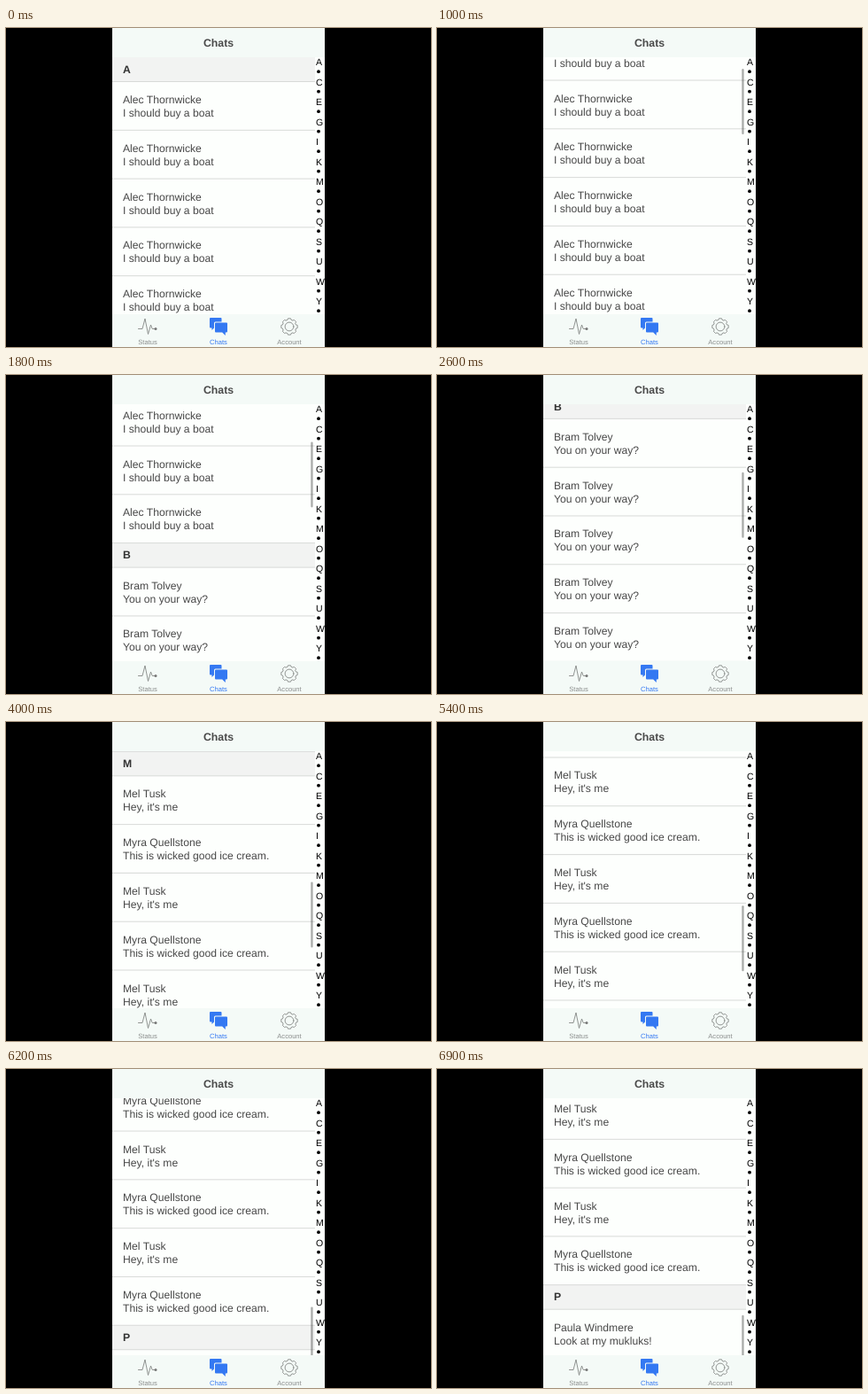
Animation, 480 px wide and 360 px high, one loop 7 s. Source, as an HTML page:

```html
<!DOCTYPE html>
<html lang="en">
<head>
<meta charset="utf-8">
<title>Chats</title>
<style>
  html, body { margin: 0; width: 100%; height: 100%; overflow: hidden; background: #000; }
  svg { display: block; width: 480px; height: 360px; font-family: "Liberation Sans", Arial, sans-serif; text-rendering: geometricPrecision; }
  .row { font-size: 12.15px; fill: #484848; }
  .head { font-size: 12.2px; font-weight: bold; fill: #333; }
  .title { font-size: 12.3px; font-weight: bold; fill: #4a4a4a; text-anchor: middle; }
  .index { font-size: 10.5px; fill: #000; }
  .tab { font-size: 7.6px; fill: #8b8e8d; text-anchor: middle; }
  .icon { fill: none; stroke: #858886; stroke-width: .9; stroke-linejoin: round; stroke-linecap: round; }
  .rule { fill: #d8dad8; }
  .band { fill: #f2f3f2; }
</style>
</head>
<body>
<svg viewBox="0 0 480 360">
  <rect width="480" height="360"/>
  <rect x="120" width="240" height="360" fill="#fdfffd"/>
  <g id="list"></g>
  <rect x="349" y="33" width="11" height="290" fill="#fdfffd"/>
  <g id="index" class="index"></g>
  <rect id="thumb" x="344.3" width="2.3" height="74" rx="1.1" fill="#000" opacity=".33"/>

  <rect x="120" width="240" height="33" fill="#f4faf7"/>
  <text class="title" x="240" y="21">Chats</text>

  <rect x="120" y="323" width="240" height="37" fill="#f4faf7"/>
  <path class="icon" d="M149.5 339.5h4.500l3-11.500 3.500 17.500 3-10.500 1.700 4.500h2.800"/>
  <circle cx="169" cy="339.5" r="1.5" fill="#777"/>
  <g fill="#3478f2">
    <path d="M231 327h11.500q1 0 1 1v3.500h-7q-1.500 0-1.500 1.500v5.500l-2.500 2.500v-2.500h-1.500q-1 0-1-1v-9.500q0-1 1-1z"/>
    <path d="M237 332.500h12q1 0 1 1v9q0 1-1 1h-1.200v3.500l-3.600-3.500h-7.200q-1 0-1-1v-9q0-1 1-1z"/>
  </g>
  <path id="gear" class="icon"/>
  <circle class="icon" cx="320" cy="337" r="4.9"/>
  <g class="tab">
    <text x="160" y="357">Status</text>
    <text x="240" y="357" style="fill:#3478f2">Chats</text>
    <text x="320" y="357">Account</text>
  </g>
</svg>
<script>
const $ = id => document.getElementById(id);
const TOP = 33, HEAD = 27.5, ROW = 54.8, LOOP = 7000, STEP = 100, DECAY = 437;

const sections = [
  ["A", 6, [["Alec Thornwicke", "I should buy a boat"]]],
  ["B", 6, [["Bram Tolvey", "You on your way?"]]],
  ["M", 12, [["Mel Tusk", "Hey, it's me"], ["Myra Quellstone", "This is wicked good ice cream."]]],
  ["P", 6, [["Paula Windmere", "Look at my mukluks!"]]]
];

const text = (cls, x, y, s) => `<text class="${cls}" x="${x}" y="${y}">${s}</text>`;
const rect = (cls, y, h) => `<rect class="${cls}" x="120" y="${y}" width="229" height="${h}"/>`;

// Rules are painted last, centred on the edges between rows
let y = TOP, rows = "", rules = "";
const advance = h => {
  y += h;
  rules += rect("rule", y - .5, 1);
};
for (const [letter, count, people] of sections) {
  rows += rect("band", y, HEAD) + text("head", 132, y + 17.8, letter);
  advance(HEAD);
  for (let i = 0; i < count; i++) {
    const [name, line] = people[i % people.length];
    rows += text("row", 132, y + 24.5, name) + text("row", 132, y + 39.5, line);
    advance(ROW);
  }
}
$("list").innerHTML = rows + rules;

// Every second letter, with dots between
$("index").innerHTML = Array.from({ length: 13 }, (_, i) => {
  const ly = 42.2 + i * 22.5;
  return text("", 350, ly, String.fromCharCode(65 + 2 * i)) + `<circle cx="353" cy="${ly + 7}" r="1.9"/>`;
}).join("");

const teeth = [];
for (let k = 0; k < 8; k++) {
  for (const [da, r] of [[-.27, 7.9], [-.17, 9.3], [.17, 9.3], [.27, 7.9]]) {
    const a = k * Math.PI / 4 + da;
    teeth.push((320 + r * Math.cos(a)).toFixed(2) + " " + (337 + r * Math.sin(a)).toFixed(2));
  }
}
$("gear").setAttribute("d", "M" + teeth.join("L") + "Z");

// Flicks: finger drag from start to release, then exponential glide until caught
const flicks = [
  { start: 500, release: 800, stop: 1400, at: 28, end: 105 },
  { start: 1500, release: 1700, stop: 2300, at: 160, end: 354 },
  { start: 2500, release: 2700, stop: 3200, at: 430, end: 844.2 },
  { start: 5200, release: 5400, stop: 7000, at: 842.7, end: 1198.5 }
];
function scrollAt(t) {
  let s = 0;
  for (const f of flicks) {
    if (t <= f.start) break;
    if (t < f.release) return s + (f.at - s) * (t - f.start) / (f.release - f.start);
    s = f.end - (f.end - f.at) * Math.exp((f.release - Math.min(t, f.stop)) / DECAY);
  }
  return s;
}

const began = performance.now();
function draw() {
  const t = Math.floor((performance.now() - began) % LOOP / STEP) * STEP;
  const s = scrollAt(t);
  $("list").setAttribute("transform", `translate(0 ${-s.toFixed(2)})`);
  $("thumb").setAttribute("y", 34.5 + s * .205);
  $("thumb").style.visibility = s > 0 ? "visible" : "hidden";
  requestAnimationFrame(draw);
}
draw();
</script>
</body>
</html>
```
